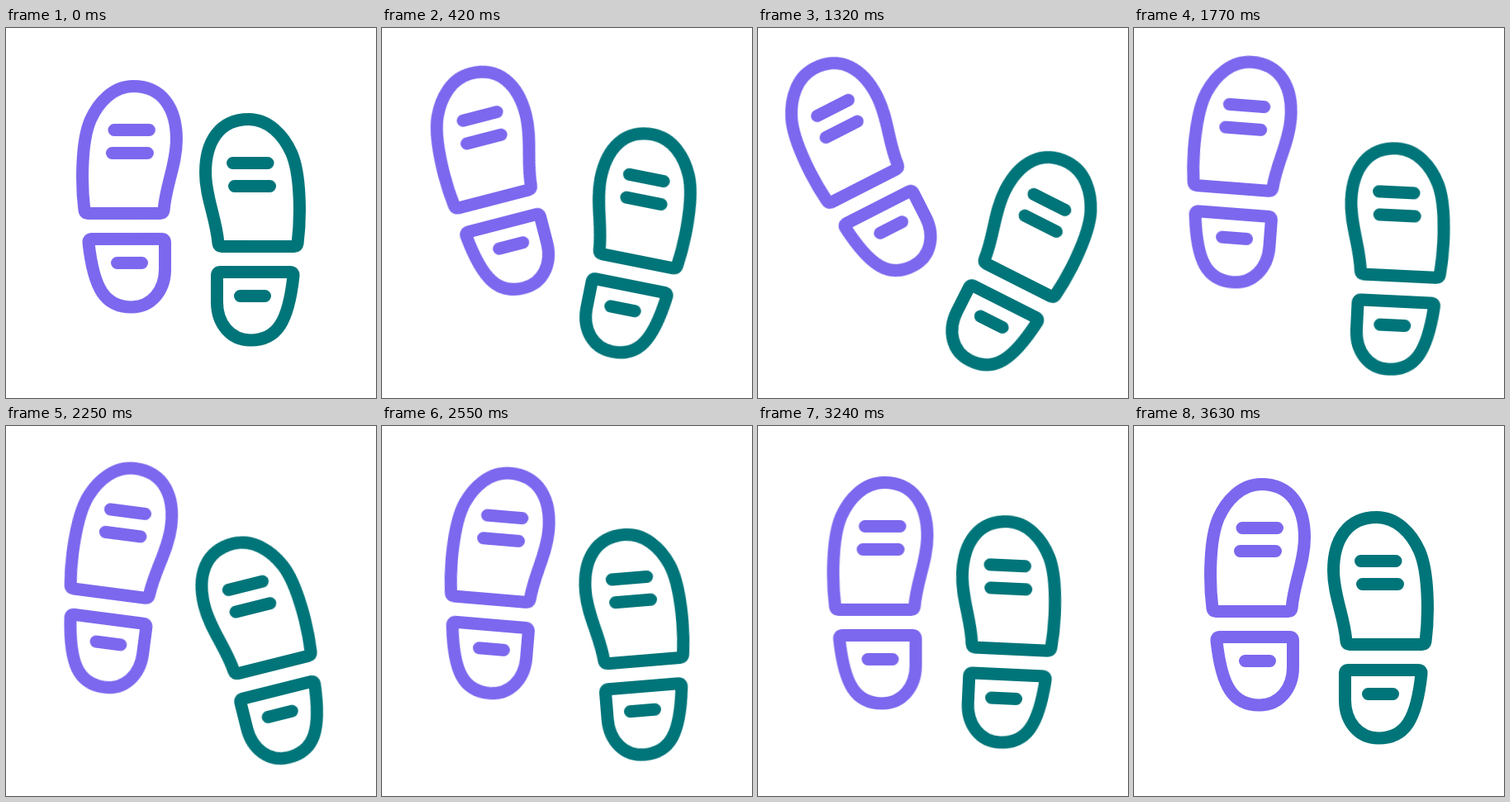
An HTML page that plays this animation: 448x448 px, repeating every 5.4 s.

```html
<!DOCTYPE html>
<html lang="en">
<head>
<meta charset="utf-8">
<title>Footprints</title>
<style>
  html, body { margin: 0; width: 100%; height: 100%; overflow: hidden; background: #fff; }
  svg { display: block; width: 100vw; height: 100vh; }
  .shoe { fill: none; stroke-width: 15; stroke-linecap: round; stroke-linejoin: round; }
  #left .turn { transform-origin: 149.5px 204px; }
  #right .turn { transform-origin: 298.5px 244px; }
</style>
</head>
<body>
<svg viewBox="0 0 448 448">
  <defs>
    <g id="shoe">
      <path d="M99 224.5Q95.5 224.5 95 221C91 190 91 137 102.5 111C112 90 130 70.5 154 70.5C190 70.5 206.5 98 206.5 135C206.5 165 193.5 190 191 221Q190.5 224.5 187 224.5Z"/>
      <path d="M104 255.5H188.5Q192.5 255.5 192.5 259.5V292C192.5 318 176 338 152 338C120 338 106 316 100 260Q99.5 255.5 104 255.5Z"/>
      <path d="M131 123.5H173.5M128.5 151.5H171.5M134.5 284.5H164.5"/>
    </g>
  </defs>
  <g id="left" class="shoe" stroke="#7b68ee">
    <g class="turn"><use href="#shoe"/></g>
  </g>
  <g id="right" class="shoe" stroke="#007579">
    <g class="turn"><use href="#shoe" transform="translate(448 40) scale(-1 1)"/></g>
  </g>
</svg>
<script>
const LOOP = 5400, PEAK = 1200, END = 3630;
const sineOut = 'cubic-bezier(.39,.575,.565,1)';
const sineInOut = 'cubic-bezier(.37,0,.63,1)';
const snap = 'cubic-bezier(.76,0,.24,1)';
const lateRise = 'cubic-bezier(.25,.2,.667,1)';
const softReturn = 'cubic-bezier(.33,0,.75,.9)';

// steps: [ms, transform, easing towards the next step]
function play(selector, steps) {
  const last = steps[steps.length - 1];
  const frames = [...steps, [LOOP, last[1]]].map(([ms, transform, easing = 'linear']) =>
    ({ offset: ms / LOOP, transform, easing }));
  document.querySelector(selector).animate(frames, { duration: LOOP, iterations: Infinity });
}

const move = (x, y) => `translate(${x}px, ${y}px)`;
const turn = deg => `rotate(${deg}deg)`;

play('#left', [
  [0, move(0, 0), sineOut],
  [PEAK, move(-25, -34.4), sineInOut],
  [END, move(0, 0)]
]);
play('#left .turn', [
  [0, turn(0), sineOut],
  [PEAK, turn(-27)],
  [1500, turn(-27), snap],
  [1900, turn(8)],
  [2050, turn(8), sineInOut],
  [3200, turn(0)]
]);

play('#right', [
  [0, move(0, 0), lateRise],
  [PEAK, move(20.6, 40.2), softReturn],
  [END, move(0, 0)]
]);
play('#right .turn', [
  [0, turn(0), lateRise],
  [PEAK, turn(26.8)],
  [1400, turn(26.8), sineInOut],
  [2070, turn(-14.3)],
  [2200, turn(-14.3), sineInOut],
  [2900, turn(4.8), sineInOut],
  [END, turn(0)]
]);
</script>
</body>
</html>
```
